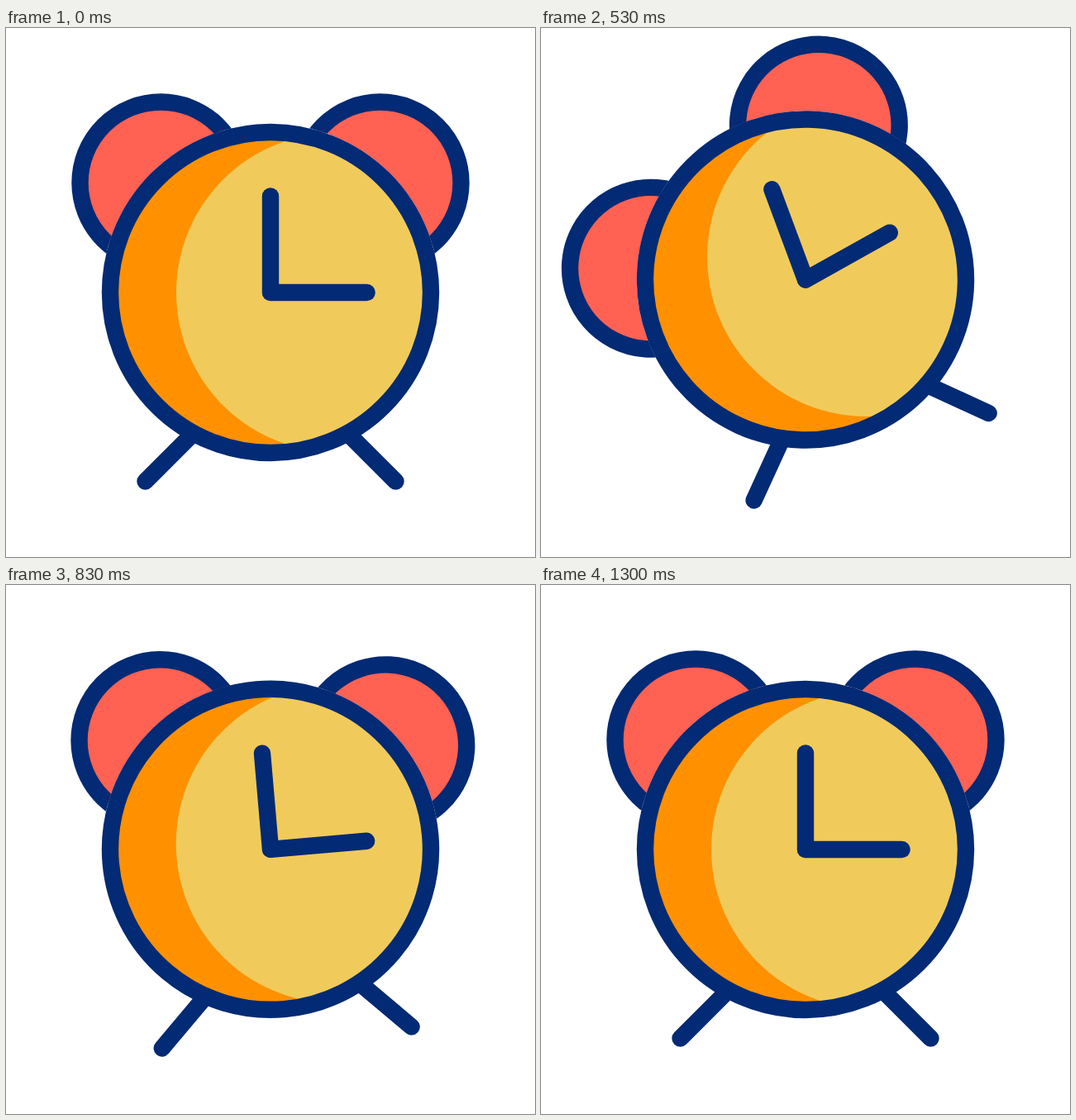
Animation of 640x640 px, one loop 1.67 s. Source, as an HTML page:

```html
<!DOCTYPE html>
<html lang="en">
<head>
<meta charset="utf-8">
<title>Ringing alarm clock</title>
<style>
  html, body { margin: 0; width: 100%; height: 100%; overflow: hidden; background: #fff; }
  svg { display: block; width: 100%; height: 100%; }
  .line { fill: none; stroke: #032a74; stroke-width: 20.4; stroke-linecap: round; stroke-linejoin: round; }
  .bell { fill: #ff6152; }
</style>
</head>
<body>
<svg viewBox="-320 -320 640 640">
  <defs>
    <clipPath id="outside">
      <path clip-rule="evenodd" d="M-400-400H400V400H-400ZM-204.2 0a204.2 204.2 0 0 0 408.4 0a204.2 204.2 0 0 0-408.4 0Z"/>
    </clipPath>
    <clipPath id="dial"><circle r="194"/></clipPath>
  </defs>
  <g id="clock">
    <g id="left" clip-path="url(#outside)"><circle class="line bell" style="fill:#ff6152" cx="-132.7" cy="-132.7" r="97.8"/></g>
    <g id="right" clip-path="url(#outside)"><circle class="line bell" style="fill:#ff6152" cx="132.7" cy="-132.7" r="97.8"/></g>
    <path class="line" d="M-151.5 228.5L-85 162M151.5 228.5L85 162"/>
    <g clip-path="url(#dial)">
      <circle r="194" fill="#ff9100"/>
      <circle cx="79" r="193" fill="#f0cb5b"/>
    </g>
    <circle class="line" r="194"/>
    <path id="minute" class="line" d="M0 0V-116.6"/>
    <path id="hour" class="line" d="M0 0H116.6"/>
  </g>
</svg>
<script>
  const LOOP = 1670, STEP = 1000 / 30;
  const el = id => document.getElementById(id);

  // Symmetric cubic Bézier easing with handles (x, y) and (1 - x, 1 - y)
  const bezier = (x, y) => t => {
    const at = (c, s) => 3 * s * (1 - s) * ((1 - s) * c + s * (1 - c)) + s ** 3;
    let lo = 0, hi = 1;
    for (let i = 0; i < 24; i++) {
      const mid = (lo + hi) / 2;
      if (at(x, mid) < t) lo = mid; else hi = mid;
    }
    return at(y, lo);
  };
  const ease = bezier(0.42, 0), windUp = bezier(1 / 3, 0.133);

  // Keys are [step, value, easing towards this key]
  const track = keys => n => {
    if (n <= keys[0][0]) return keys[0][1];
    for (let i = 1; i < keys.length; i++) {
      const [a, from] = keys[i - 1], [b, to, fn = ease] = keys[i];
      if (n < b) return from + (to - from) * fn((n - a) / (b - a));
    }
    return keys[keys.length - 1][1];
  };

  const hop = track([[0, 0], [12.5, -18], [26, 0]]);
  const tilt = track([[0, 0], [14.85, -24.2, windUp], [20, 13], [26, -6], [31, 3.1], [37, 0]]);
  const bell = track([[0, 0], [16, -20.4, windUp], [23, 9], [28, -4.5], [32.6, 1.6], [38, 0]]);
  const minute = track([[0, 0], [15, 360]]);
  const hour = track([[0, 0], [18, 360]]);

  const turn = (id, angle, y = 0) =>
    el(id).setAttribute("transform", `translate(0 ${y}) rotate(${angle})`);

  function draw(n) {
    turn("clock", tilt(n), hop(n));
    turn("left", bell(n));
    turn("right", bell(n - 1));
    turn("minute", minute(n));
    turn("hour", hour(n));
  }

  const start = performance.now();
  function tick() {
    const t = (performance.now() - start) % LOOP;
    draw(Math.floor((t + 3.4) / STEP)); // 30 poses a second
    requestAnimationFrame(tick);
  }
  tick();
</script>
</body>
</html>
```
